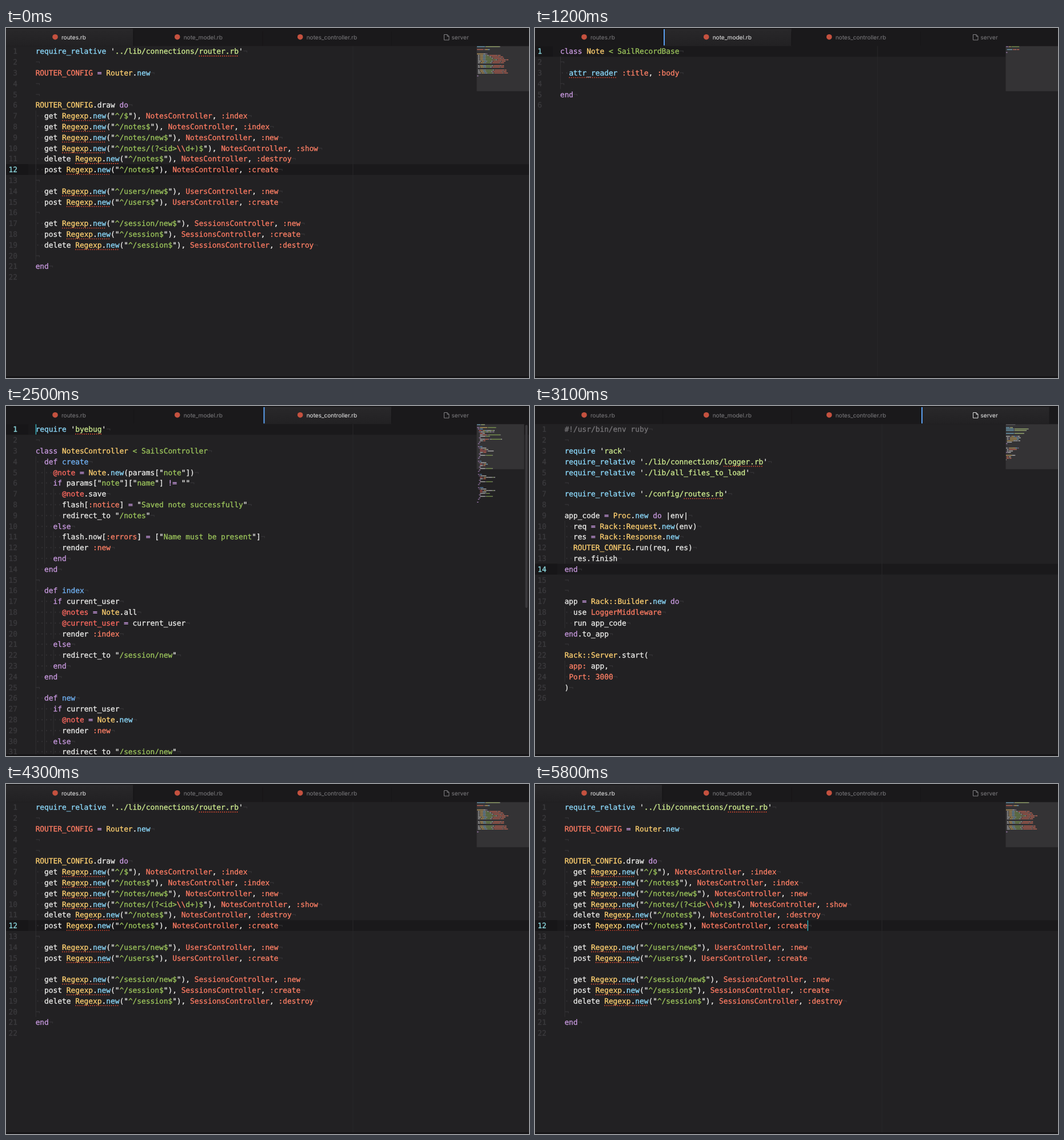
Animation, 915 px wide and 612 px high, one loop 5.9 s. Source, as an HTML page:

```html
<!DOCTYPE html>
<html lang="en">
<head>
<meta charset="utf-8">
<title>Editor tabs</title>
<style>
html, body { margin: 0; width: 100%; height: 100%; overflow: hidden; background: #222123; }
svg { display: block; }
text { white-space: pre; text-rendering: geometricPrecision; }
.code { font: 12.83px "DejaVu Sans Mono", monospace; stroke-width: 0.3px; }
.tab { font: 10.05px Inter, sans-serif; }
</style>
</head>
<body>
<svg id="stage" width="915" height="612" viewBox="0 0 915 612"></svg>
<script>
const LOOP = 5900, CHAR = 7.725, LINE = 18.8, FIRST = 40.8, BASELINE = 4.5;
const COLORS = {
  text: '#eeeeec', comment: '#777578', keyword: '#c99ae0', call: '#8cd9fb', def: '#72b4f7',
  type: '#ffd070', constant: '#ff7c63', symbol: '#ff8066', ivar: '#ff6a60',
  string: '#9dc65c', path: '#d0ee90', faint: '#38373a'
};

const routes = String.raw`
require_relative '../lib/connections/router.rb'

ROUTER_CONFIG = Router.new


ROUTER_CONFIG.draw do
  get Regexp.new("^/$"), NotesController, :index
  get Regexp.new("^/notes$"), NotesController, :index
  get Regexp.new("^/notes/new$"), NotesController, :new
  get Regexp.new("^/notes/(?<id>\\d+)$"), NotesController, :show
  delete Regexp.new("^/notes$"), NotesController, :destroy
  post Regexp.new("^/notes$"), NotesController, :create

  get Regexp.new("^/users/new$"), UsersController, :new
  post Regexp.new("^/users$"), UsersController, :create

  get Regexp.new("^/session/new$"), SessionsController, :new
  post Regexp.new("^/session$"), SessionsController, :create
  delete Regexp.new("^/session$"), SessionsController, :destroy

end
`;

const model = `
class Note < SailRecordBase

  attr_reader :title, :body

end
`;

const controller = `
require 'byebug'

class NotesController < SailsController
  def create
    @note = Note.new(params["note"])
    if params["note"]["name"] != ""
      @note.save
      flash[:notice] = "Saved note successfully"
      redirect_to "/notes"
    else
      flash.now[:errors] = ["Name must be present"]
      render :new
    end
  end

  def index
    if current_user
      @notes = Note.all
      @current_user = current_user
      render :index
    else
      redirect_to "/session/new"
    end
  end

  def new
    if current_user
      @note = Note.new
      render :new
    else
      redirect_to "/session/new"
    end
  end

  def show
    if current_user
      @note = Note.find(params["id"])
      render :show
    else
      redirect_to "/session/new"
    end
  end

  def destroy
    if current_user
      @note = Note.find(params["id"])
      @note.destroy
      redirect_to "/notes"
    else
      redirect_to "/session/new"
    end
  end

end
`;

const server = `
#!/usr/bin/env ruby

require 'rack'
require_relative './lib/connections/logger.rb'
require_relative './lib/all_files_to_load'

require_relative './config/routes.rb'

app_code = Proc.new do |env|
  req = Rack::Request.new(env)
  res = Rack::Response.new
  ROUTER_CONFIG.run(req, res)
  res.finish
end


app = Rack::Builder.new do
  use LoggerMiddleware
  run app_code
end.to_app

Rack::Server.start(
 app: app,
 Port: 3000
)
`;

const files = [
  { title: 'routes.rb', source: routes, line: 12, col: 55, tabX: 0, titleX: 97 },
  { title: 'note_model.rb', source: model, line: 1, col: 0, tabX: 225, titleX: 310.7 },
  { title: 'notes_controller.rb', source: controller, line: 1, col: 0, tabX: 450.5, titleX: 525.7 },
  { title: 'server', source: server, line: 14, col: 3, tabX: 676, titleX: 779.5 }
];

const switches = [
  { at: 3900 - LOOP, tab: 0 }, { at: 500, tab: 1 }, { at: 1500, tab: 2 },
  { at: 2700, tab: 3 }, { at: 3900, tab: 0 }
];

const stage = document.getElementById('stage');

function add(parent, name, attrs = {}, content) {
  const node = document.createElementNS('http://www.w3.org/2000/svg', name);
  for (const key in attrs) node.setAttribute(key, attrs[key]);
  if (content !== undefined) node.textContent = content;
  parent.appendChild(node);
  return node;
}

const rect = (parent, x, y, width, height, fill) =>
  add(parent, 'rect', { x, y, width, height, fill });

// Order matters: the first rule that matches at a position wins.
const rules = [
  [/^#!.*/y, 'comment'],
  [/(?<=')[^',]+(?=')/y, 'path'],
  [/\\\\/y, 'symbol'],
  [/(?<="|\\\\)[^"\\,()\[\]][^"\\]*(?="|\\\\)/y, 'string'],
  [/(?<!:):[a-z]\w*|\b(?:app|Port):|\b\d+/y, 'symbol'],
  [/@\w+/y, 'ivar'],
  [/< \w+/y, 'string'],
  [/(?<=def )\w+/y, 'def'],
  [/\b(?:class|def|if|else|end|do)\b|!=|=/y, 'keyword'],
  [/\b(?:require_relative|require|attr_reader|new)\b/y, 'call'],
  [/(?<=class )\w+|\b[A-Z]\w*(?=\.|::)|::/y, 'type'],
  [/\b[A-Z]\w*/y, 'constant'],
  [/\w+|\s+|./y, 'text']
];

function tokenize(line) {
  const tokens = [];
  for (let col = 0; col < line.length;) {
    for (const [rule, kind] of rules) {
      rule.lastIndex = col;
      const match = rule.exec(line);
      if (!match) continue;
      tokens.push({ col, kind, value: match[0] });
      col += match[0].length;
      break;
    }
  }
  return tokens;
}

const indentOf = line => line.search(/\S/);

function guideCount(lines, i) {
  if (lines[i]) return Math.ceil(indentOf(lines[i]) / 2);
  const before = lines.slice(0, i).reverse().find(Boolean);
  const after = lines.slice(i + 1).find(Boolean);
  return Math.ceil(Math.max(before ? indentOf(before) : 0, after ? indentOf(after) : 0) / 2);
}

function drawLine(group, line, tokens, left, y, isLast) {
  const text = add(group, 'text', { class: 'code', x: left, y: y + BASELINE });
  const span = (value, fill, stroke = 'none') => add(text, 'tspan', { fill, stroke }, value);
  const indent = Math.max(0, indentOf(line));
  span('·'.repeat(indent), COLORS.faint);
  for (const token of tokens)
    if (token.col >= indent) span(token.value, COLORS[token.kind], COLORS[token.kind]);
  if (!isLast) span('¬', COLORS.faint);

  for (const match of line.matchAll(/Regexp\.new|(?:router|logger|routes)\.rb|byebug|attr_reader/g)) {
    const x = left + match.index * CHAR;
    add(group, 'line', {
      x1: x + 0.9, x2: x + match[0].length * CHAR, y1: y + 8.2, y2: y + 8.2,
      stroke: '#e2492f', 'stroke-width': 1.8, 'stroke-linecap': 'round', 'stroke-dasharray': '0 3.67'
    });
  }
}

function drawMinimap(group, tokenLines, scrolls) {
  rect(group, 823.5, 31.5, scrolls ? 83 : 91.5, 79, '#343335');
  tokenLines.forEach((tokens, i) => {
    for (const token of tokens) {
      if (!token.value.trim()) continue;
      const bar = rect(group, 824 + token.col * 0.86, 31.8 + i * 2.56,
        token.value.length * 0.86, 1.5, COLORS[token.kind]);
      bar.setAttribute('opacity', 0.62);
    }
  });
  if (scrolls) add(group, 'rect', { x: 908.5, y: 33, width: 4, height: 320, rx: 2, fill: '#3a393c' });
}

function drawEditor(file) {
  const group = add(stage, 'g');
  const lines = file.source.slice(1).split('\n');
  const digits = String(lines.length).length;
  const left = 36.2 + digits * CHAR;
  const tokenLines = lines.map(tokenize);
  const currentY = FIRST + (file.line - 1) * LINE;

  rect(group, 0, currentY - LINE / 2, 915, LINE, '#1a191b');
  rect(group, 0, currentY - LINE / 2, left - 13, LINE, '#171618');
  rect(group, left + 554.8, 31, 1, 578, '#29282a');

  lines.forEach((line, i) => {
    const y = FIRST + i * LINE;
    if (y > 620) return;
    for (let g = 0; g < guideCount(lines, i); g++)
      rect(group, left + g * 2 * CHAR, y - LINE / 2, 1, LINE, '#323133');
    const color = i + 1 === file.line ? '#8bd6dc' : '#3b3a3d';
    add(group, 'text', {
      class: 'code', x: 4.6 + digits * CHAR, y: y + BASELINE, 'text-anchor': 'end',
      fill: color, stroke: color
    }, i + 1);
    drawLine(group, line, tokenLines[i], left, y, i === lines.length - 1);
  });

  drawMinimap(group, tokenLines, lines.length > 31);
  file.cursor = rect(group, left + file.col * CHAR, currentY - LINE / 2 + 0.3, 1.5, LINE - 0.6, '#35a9b5');
  file.editor = group;
}

function drawTab(file, i) {
  file.panel = rect(stage, file.tabX, 1.5, i ? 223.5 : 222, 30, 'url(#active)');
  if (i) rect(stage, file.tabX - 2, 6, 1, 25, '#161517');
  file.accent = rect(stage, file.tabX, 2, 2, 28.5, '#5a9ff0');
  if (i < 3) {
    add(stage, 'circle', { cx: file.titleX - 11, cy: 15.7, r: 4.8, fill: '#c4513f' });
  } else {
    file.icon = add(stage, 'path', {
      d: 'M766.5 11.5h5.5l3 3v6.5h-8.5zM772 11.5v3h3', fill: 'none', 'stroke-width': 1
    });
  }
  file.label = add(stage, 'text', { class: 'tab', x: file.titleX, y: 19.6 }, file.title);
}

const gradient = add(add(stage, 'defs'), 'linearGradient', { id: 'active', x2: 0, y2: 1 });
add(gradient, 'stop', { offset: 0, 'stop-color': '#29282a' });
add(gradient, 'stop', { offset: 1, 'stop-color': '#222123' });

rect(stage, 0, 0, 915, 612, '#222123');
files.forEach(drawEditor);
rect(stage, 0, 0, 915, 31.5, '#1a191b');
rect(stage, 0, 0, 915, 1.5, '#151416');
files.forEach(drawTab);
rect(stage, 0, 609, 915, 3, '#161517');

function render(time) {
  const index = switches.findLastIndex(s => s.at <= time);
  const { at, tab } = switches[index];
  const previous = index ? switches[index - 1].tab : -1;
  const elapsed = time - at;
  const fade = Math.min(1, elapsed / 160);

  files.forEach((file, i) => {
    const active = i === tab;
    const shown = active ? 'inline' : 'none';
    file.editor.setAttribute('display', shown);
    file.panel.setAttribute('display', shown);
    file.label.setAttribute('fill', active ? '#f0f0f0' : '#7f7e81');
    if (file.icon) file.icon.setAttribute('stroke', active ? '#e0e0e0' : '#828184');
    // The first tab's accent lies outside the visible area.
    file.accent.setAttribute('opacity', !i ? 0 : active ? fade : i === previous ? 1 - fade : 0);
    file.cursor.setAttribute('opacity', elapsed % 800 < 400 ? 1 : 0);
  });
}

function tick() {
  render(performance.now() % LOOP);
  requestAnimationFrame(tick);
}
tick();
</script>
</body>
</html>
```
